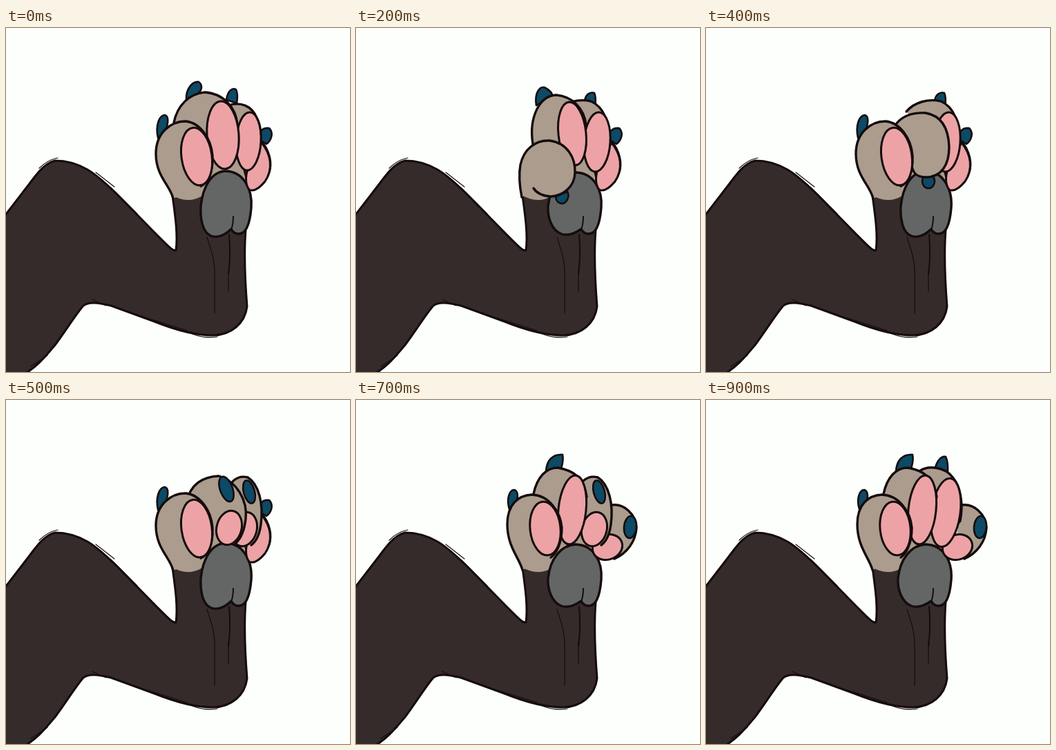
Recreate the animation shown at these times as an HTML page. Size 498 by 498 pixels, loop 1 s.

```html
<!DOCTYPE html>
<html lang="en">
<head>
<meta charset="utf-8">
<title>Paw wave</title>
<style>
html, body { margin: 0; width: 100%; height: 100%; overflow: hidden; background: #fdfffd; }
svg { display: block; width: 100vw; height: 100vh; }
path { stroke: #150c0d; stroke-width: 3.4; stroke-linecap: round; stroke-linejoin: round; }
.leg { fill: #362b2b; stroke-width: 3; }
.tan { fill: #ab9c8d; }
.pink { fill: #eda3a6; stroke-width: 3; }
.claw { fill: #0c4a66; stroke-width: 2.6; }
.pad { fill: #646666; }
.flat { stroke: none; }
.line { fill: none; stroke-width: 2; }
.hair { fill: none; stroke-width: 1.2; }
</style>
</head>
<body>
<svg viewBox="0 0 498 498">
  <path class="leg" d="M241 243C245 272 249 300 246 322C241 323 235 316 216 297L165 245C146 226 130 212 118 205C104 197 88 192 71 192C56 196 46 209 32 228L-5 276V505H20C44 492 56 477 71 459C86 439 98 419 111 403C119 395 134 398 152 402L215 425C245 437 275 445 300 445C326 444 346 428 349 403C346 365 344 330 347 293"/>
  <path class="leg flat" d="M242.500 240H345V305L250 265Z"/>
  <path class="line" d="M323 299C325 322 324 342 322 356"/>
  <path class="hair" d="M291 303C297 322 302 335 302 352V413M322 350V381M48 203Q60 191 75 188M130 209L157 230M18 247L42 216M125 393L145 402M205 420L262 438M270 443Q288 450 306 447M152 231L190 269M36 490L60 474"/>
  <path class="tan flat" d="M239 241Q262 256 284 243L295 205H235Z"/>
  <path class="tan flat" d="M292 150L350 160L345 228H290Z"/>
  <g id="foot"></g>
</svg>
<script>
const oval = (x, y, rx, ry, deg = 0) => {
  const a = deg * Math.PI / 180, dx = rx * Math.cos(a), dy = rx * Math.sin(a);
  const arc = `A${rx} ${ry} ${deg} 1 1 `;
  return `M${x - dx} ${y - dy}${arc}${x + dx} ${y + dy}${arc}${x - dx} ${y - dy}Z`;
};
const part = cls => d => `<path class="${cls}" d="${d}"/>`;
const tan = part('tan'), pink = part('pink'), claw = part('claw');

const pad = (left, top, bottom) =>
  part('pad')(`M318 ${top}C345 ${top + 1} 357 235 355 260C353 285 347 298 337 298C331 298 328 295 326 291C316 ${bottom - 1} 305 ${bottom + 2} 297 ${bottom - 1}C284 ${bottom - 6} ${left - 1} 275 ${left} 258C${left + 3} 230 297 ${top + 1} 318 ${top}Z`) +
  part('line')('M329 273Q329 284 326 292');
const pads = { a: pad(282, 207, 302), b: pad(278, 209, 299) };

// Poses: a, b, m = raised; h = half curled; d = fully curled
const inner = {
  a: claw('M220 159C216 141 222 126 230 126C237 128 234 140 231 150Z') +
     tan('M242 247C238 228 217 215 217 182C217 152 238 135 260 135C281 137 297 160 299 185C300 210 292 224 282 229') +
     pink(oval(276, 186, 22, 42, -8)),
  b: claw('M222 158C217 142 223 130 229 130C236 132 234 142 233 147Z') +
     tan('M241 246C236 228 219 212 219 180C219 152 234 138 255 137C278 138 296 160 298 185C298 208 290 222 282 228') +
     pink(oval(274, 186, 22, 39, -6)),
  h: tan('M241 246C229 228 226 210 227 190C228 163 246 147 265 147C290 148 306 168 308 195Q308 204 304 210') +
     pink(oval(282, 214, 25, 17, -27)) + claw(oval(283, 171, 9, 17, -25)),
  d: tan('M240 245C237 230 235 215 238 198C243 175 260 162 280 163C305 166 318 187 317 210C316 230 300 243 282 244C270 243 262 240 257 232') +
     claw('M289 244C290 255 300 257 305 250C308 245 308 240 306 237Z')
};
const second = {
  a: claw('M261 104C260 88 270 77 279 78C286 83 284 94 270 101Z') +
     tan('M243 137C248 112 265 95 288 93C315 95 333 115 335 140L315 190') +
     pink(oval(314, 155, 23, 49, -4)),
  m: claw('M261 112C258 94 266 84 273 86C281 90 286 96 283 99Z') +
     tan('M256 168C250 130 265 98 290 97C312 99 330 115 333 140L315 185') +
     pink(oval(313, 153, 20, 46, -6)),
  b: claw('M275 103C276 88 284 78 299 79C301 88 298 95 297 99Z') +
     tan('M257 136C262 112 275 98 292 98C315 102 330 112 334 140L312 190') +
     pink(oval(313, 159, 20, 50, 6)),
  h: tan('M262 148C266 122 285 111 308 110C334 118 350 145 347 172C345 190 340 200 333 207') +
     pink(oval(323, 185, 18, 25, 15)) + claw(oval(319, 129, 9, 19, -20)),
  d: claw(oval(322, 222, 9, 10)) +
     tan('M276 138C285 127 300 122 318 123C341 127 351 145 352 172C352 198 341 216 318 216C305 216 300 210 298 200')
};
const third = {
  a: claw('M319 104C321 90 328 86 333 89C336 95 335 103 334 109Z') +
     tan('M322 112C340 106 356 113 363 130C370 142 371 165 365 182L350 190') +
     pink(oval(351, 164, 18, 42, 3)),
  m: claw('M331 108C331 96 339 92 345 94C348 100 347 108 346 115Z') +
     tan('M290 121C302 107 322 102 340 106C359 114 369 140 366 167L350 190') +
     pink(oval(349, 165, 19, 43, 4)),
  b: claw('M331 101C334 88 340 81 347 82C351 90 350 98 350 105Z') +
     tan('M309 103C320 95 345 95 358 113C368 125 373 150 368 175L350 195') +
     pink(oval(347, 163, 21, 50, 8)),
  h: tan('M318 140C322 118 335 108 350 112C366 122 373 150 369 180C367 195 362 205 355 210') +
     pink(oval(345, 187, 18, 25, 15)) + claw(oval(352, 133, 8, 17, -15)),
  d: claw('M320 226C316 240 326 246 333 243C339 240 341 234 340 230Z') +
     tan('M332 133C352 130 366 150 368 172C368 200 358 230 338 231C328 230 322 224 318 214')
};
const outerToe =
  tan('M366 162C378 170 385 190 382 205C377 225 364 235 353 234L345 205') +
  pink('M370 166C384 183 387 204 375 222C366 233 358 237 352 234C345 225 347 210 352 200Z');
const outer = {
  a: claw('M369 163C363 150 372 144 381 145C388 152 384 163 377 168Z') + outerToe,
  b: claw('M369 166C364 155 370 151 379 152C385 158 382 168 377 172Z') + outerToe,
  h: tan('M371 152C388 150 405 165 406 185C405 205 392 222 374 230L360 212') +
     pink(oval(364, 213, 22, 18, -20)) + claw(oval(397, 184, 9, 16, 5)),
  d: tan('M372 171C392 172 404 190 404 208C403 230 390 243 374 243C358 240 347 234 344 222') +
     claw(oval(341, 229, 10, 8, 10))
};

// Each step: pad, outer, third, second, inner
const layers = [pads, outer, third, second, inner];
const steps = ['aaaaa', 'bammh', 'bammd', 'aamhh', 'aamda',
               'aahha', 'bbdbb', 'bhhbb', 'bdbbb', 'bhbbb'];
const foot = document.getElementById('foot');
let shown = -1;

function draw() {
  const step = Math.floor(performance.now() % 1000 / 100);
  if (step !== shown) {
    foot.innerHTML = layers.map((poses, i) => poses[steps[step][i]]).join('');
    shown = step;
  }
  requestAnimationFrame(draw);
}
draw();
</script>
</body>
</html>
```
